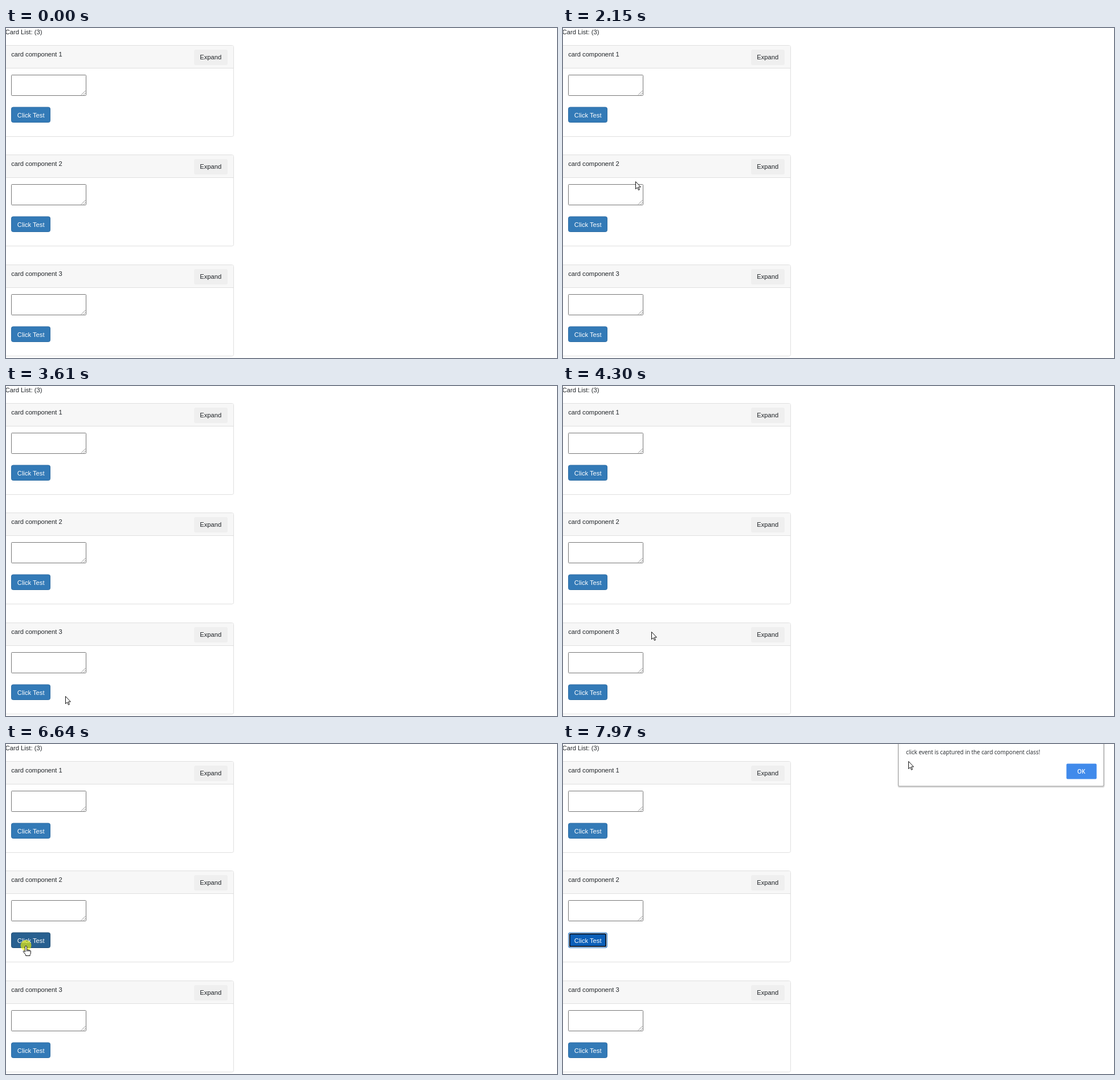
Write an HTML page that moves like this. It is 967 px wide and 579 px high and loops after 8000 ms.

```html
<!DOCTYPE html>
<html lang="en">
<head>
<meta charset="utf-8">
<title>Card list</title>
<style>
html, body { margin: 0; width: 100%; height: 100%; overflow: hidden; background: #fff; }
svg { display: block; width: 967px; height: 579px; }
text { font: 11.2px "Liberation Sans", Arial, sans-serif; fill: #212529; }
.white { fill: #fff; }
.dialog text { font: 9.88px "Open Sans", "Noto Sans", sans-serif; }
.dialog .white { font-weight: 600; fill: #fff; }
.btn { fill: #337ab7; stroke: #2e6da4; }
.hover .btn { fill: #286090; stroke: #204d74; }
.focus .btn { fill: #0b5fb9; stroke: #2b78c4; }
.ring { display: none; fill: none; }
.focus .ring { display: inline; }
.cursor { fill: #fff; stroke: #111; stroke-linejoin: round; }
</style>
</head>
<body>
<svg viewBox="0 0 967 579">
  <text x="-1.3" y="10.5">Card List: (3)</text>
  <g id="cards"></g>
  <g id="dialog" class="dialog">
    <rect x="587.5" y="-6" width="363" height="82.5" rx="3" opacity=".15"/>
    <rect x="588.5" y="-6" width="360.5" height="80" rx="2" fill="#fff" stroke="#999"/>
    <text x="602" y="18.3">click event is captured in the card component class!</text>
    <rect x="883.5" y="34.5" width="53" height="27" rx="2" fill="#408aeb"/>
    <text class="white" x="909.5" y="51.5" text-anchor="middle">OK</text>
  </g>
  <circle id="click" cx="35" cy="353.5" r="9.5" fill="#ff0" opacity=".6"/>
  <g id="cursor" class="cursor">
    <path id="arrow" d="M.5 .5V13.5L3.5 10.8 5.5 15.4 7.4 14.6 5.4 10H9.4Z"/>
    <path id="beam" fill="none" stroke="#333" d="M-3 -5.5H-1L0 -4.5 1 -5.5H3M0 -4.5V4.5M-3 5.5H-1L0 4.5 1 5.5H3"/>
    <path id="hand" d="M-1.5 11V1.9a1.5 1.5 0 0 1 3 0V7L3.8 7.3 6 7.9 8.3 9V13q0 1.5-1.2 2.7V17.5H-.3V15.8L-4.5 10.8q-.8-1.6.6-2 1 0 2.4 2.2ZM1.5 7v3M3.8 7.3v2.7M6 7.9v2.3"/>
  </g>
</svg>
<script>
const $ = id => document.getElementById(id);
const offset = i => Math.floor(i * 192.5);

const card = i => `<g transform="translate(0 ${offset(i)})">
  <rect x="-5" y="30.5" width="404.5" height="160" rx="3" fill="#fff" stroke="#dfdfdf"/>
  <path d="M0 31H397q2 0 2 2V70H0Z" fill="#f7f7f7"/>
  <path d="M0 70.5H399" stroke="#dfdfdf"/>
  <text x="9.2" y="49.8">card component ${i + 1}</text>
  <rect x="330" y="38" width="59" height="27" rx="3" fill="#efefef"/>
  <text x="359.3" y="55.2" text-anchor="middle">Expand</text>
  <rect x="9.5" y="82.5" width="131" height="36" rx="1" fill="#fff" stroke="#767676"/>
  <path d="M132 117.5L139.5 110M136 117.5L139.5 114" stroke="#777" stroke-width=".8"/>
  <g id="btn${i}">
    <rect class="btn" x="9.5" y="139" width="68" height="26.5" rx="3"/>
    <g class="ring">
      <rect x="10.5" y="140" width="66" height="24.5" rx="2.5" stroke="#fff"/>
      <rect x="11.8" y="141.3" width="63.4" height="21.9" rx="2" stroke="#0c1420" stroke-width="1.8"/>
    </g>
    <text class="white" x="43.7" y="156.5" text-anchor="middle">Click Test</text>
  </g>
</g>`;
$("cards").innerHTML = [0, 1, 2].map(card).join("");

// Key points of the pointer: time, x, y
const path = [
  [230, 925, 574], [600, 600, 300], [900, 220, 46], [1070, 107, 54],
  [1227, 39, 117], [1500, 50, 160], [1830, 299, 203],
  [2300, 45, 300], [2500, 55, 368], [2760, 237, 229], [3068, 162, 296],
  [3400, 45, 500], [3610, 105, 545], [3920, 335, 500], [4295, 155, 431],
  [4832, 155, 431], [5630, 43, 361], [6080, 35, 354], [6670, 35, 354],
  [7210, 356, 417], [7440, 630, 207], [7977, 606, 30]
];
const press = 6640, alertAt = 6794, step = 76.7;

// The pointer moves at 13 steps per second
const snap = t => Math.floor((t + 24) / step) * step;

function pointAt(t) {
  const i = path.findIndex(p => p[0] > t);
  if (i < 1) return path.at(i).slice(1);
  const [a, b] = [path[i - 1], path[i]];
  const k = (t - a[0]) / (b[0] - a[0]);
  return [a[1] + (b[1] - a[1]) * k, a[2] + (b[2] - a[2]) * k];
}

const show = (id, on) => $(id).style.display = on ? "inline" : "none";

function draw(t) {
  const [x, y] = pointAt(snap(t)).map(Math.round);
  const alerted = t >= alertAt;
  const over = (left, top, right, bottom) => [0, 1, 2].findIndex(i =>
    x >= left && x <= right && y >= top + offset(i) && y <= bottom + offset(i));
  const button = over(10, 139, 78, 166);

  let shape = "arrow";
  if (t >= press) shape = y > 74 ? "hand" : "arrow";
  else if (button >= 0 || over(330, 38, 389, 65) >= 0) shape = "hand";
  else if (over(10, 82, 140, 118) >= 0) shape = "beam";
  for (const id of ["arrow", "beam", "hand"]) show(id, id === shape);

  for (let i = 0; i < 3; i++) {
    const state = alerted ? (i === 1 ? "focus" : "") : (i === button ? "hover" : "");
    $("btn" + i).setAttribute("class", state);
  }
  show("dialog", alerted);
  show("click", t >= press && !alerted);
  show("cursor", t >= 70);
  $("cursor").setAttribute("transform", `translate(${x} ${y})`);
}

function tick() {
  draw(performance.now() % 8000);
  requestAnimationFrame(tick);
}
tick();
</script>
</body>
</html>
```
